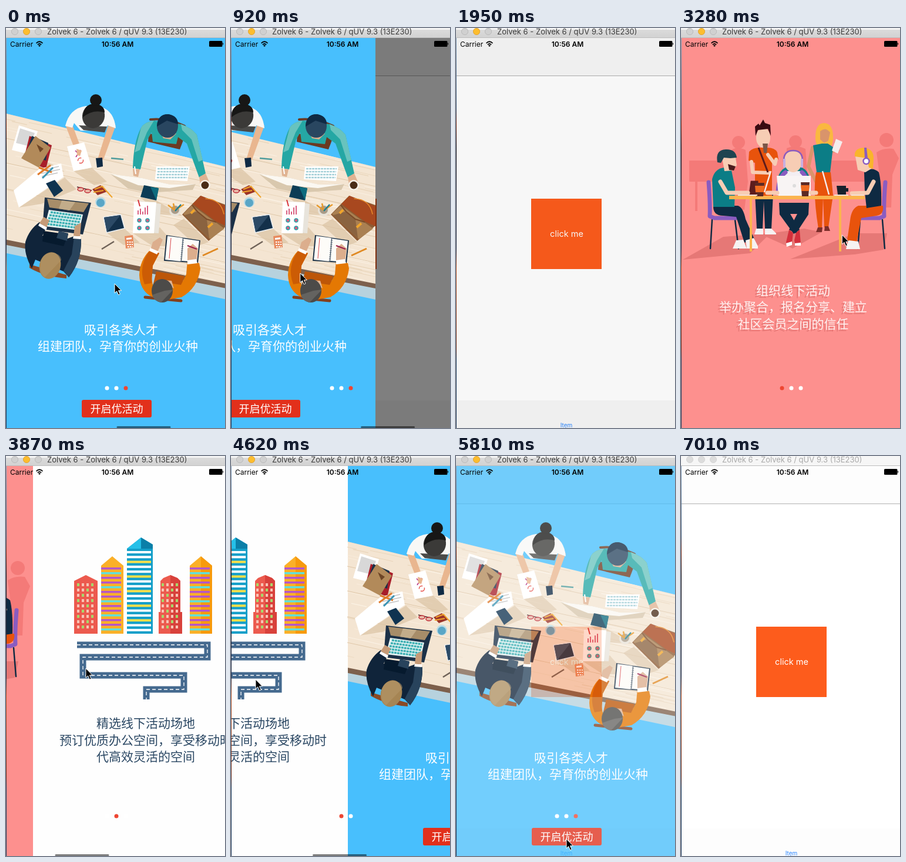
Write an HTML page that moves like this. It is 373 px wide and 682 px high and loops after 7.09 s.

```html
<!DOCTYPE html>
<html lang="zh">
<head>
<meta charset="utf-8">
<title>Onboarding pages</title>
<style>
html, body { margin: 0; width: 100%; height: 100%; overflow: hidden; background: #fff }
svg { display: block; width: 100%; height: 100% }
text { font-family: Inter, "Noto Sans CJK SC", "Noto Sans CJK", sans-serif }
.cn { font: 500 21px "Noto Sans CJK SC", "Noto Sans CJK", sans-serif; text-anchor: middle }
.btn { font-size: 18px; font-weight: 400 }
.mid { text-anchor: middle }
.ln { fill: none; stroke-linecap: round; stroke-linejoin: round }
</style>
</head>
<body>
<svg viewBox="0 0 373 682" preserveAspectRatio="none">
<defs>
  <linearGradient id="desk" x2="0" y2="1">
    <stop offset="0" stop-color="#8fa9c4"/><stop offset=".2" stop-color="#3d5878"/><stop offset=".24" stop-color="#7a2f1c"/>
    <stop offset=".3" stop-color="#14121c"/><stop offset=".55" stop-color="#25304a"/><stop offset=".6" stop-color="#b5562c"/>
    <stop offset=".8" stop-color="#6a2c1c"/><stop offset=".83" stop-color="#1f4063"/><stop offset="1" stop-color="#203a5c"/>
  </linearGradient>
  <linearGradient id="chrome" x2="0" y2="1">
    <stop offset=".16" stop-color="#f4f4f4"/><stop offset=".2" stop-color="#dadada"/><stop offset="1" stop-color="#d2d2d2"/>
  </linearGradient>
  <clipPath id="top"><path d="M0 146L376 237V436L0 361Z"/></clipPath>
  <clipPath id="screen"><rect x="1" y="17" width="372" height="665"/></clipPath>
</defs>
<rect width="373" height="682" fill="url(#desk)"/>
<g clip-path="url(#screen)">
  <rect x="1" y="17" width="372" height="665" fill="#fff"/>
  <g id="bars" fill="#f7f7f7"><rect x="1" y="17" width="372" height="64"/><rect x="1" y="635" width="372" height="47"/></g>
  <path d="M1 81.500H373" stroke="#b0b0b0"/>
  <rect x="128" y="291" width="120" height="120" fill="#fd5c1c"/>
  <text x="188.500" y="356" class="mid" font-size="14.500" fill="#fff">click me</text>
  <text x="188" y="680.500" class="mid" font-size="10" fill="#2a86ff">Item</text>

  <g id="guide">
    <rect x="1" y="17" width="372" height="665" fill="#000" opacity=".5"/>
    <g id="pages">
      <g id="meet">
        <rect x="1" y="17" width="375" height="665" fill="#fd908e"/>
        <g fill="#f47a78">
          <path d="M14 226H90V262H14ZM24 262H28V312H24ZM240 226H318V262H240ZM83 210Q94 200 110 208L114 262 108 310H86ZM180 205Q195 198 212 206L216 262H178ZM333 212Q345 204 362 206L371 222 360 250 358 306H340L338 250Z"/>
          <circle cx="98" cy="195" r="11"/><circle cx="195" cy="194" r="11"/><circle cx="350" cy="191" r="12"/>
        </g>
        <path d="M3 395L72 356 152 350 118 384ZM186 394L296 350H351L345 378 296 386ZM136 352L210 342 240 348 190 376Z" fill="#e67876"/>
        <!-- woman -->
        <path d="M229 190Q228 162 244 162 260 163 259 190 258 206 244 208 231 208 229 190Z" fill="#fab840"/>
        <path d="M237 176Q246 168 254 178L251 192 244 196 237 190Z" fill="#d9946b"/>
        <path d="M224 204L217 236 230 262M256 210L267 208 264 196" stroke="#d9946b" stroke-width="6" class="ln"/>
        <path d="M225 200L240 197 250 197 259 203 254 246H231Z" fill="#0b7d86"/>
        <path d="M230 246H255L259 285 251 340H244L242 290 240 342H234Q224 280 230 246Z" fill="#e8530c"/>
        <path d="M233 340H241L240 348H230ZM245 338H251L254 346H244Z" fill="#7c2d2a"/>
        <path d="M264 189L275 194 267 214 257 209Z" fill="#f5ecec"/>
        <!-- standing man -->
        <path d="M126 282H157L154 342H143L141 295 139 342H129Z" fill="#0e2a42"/>
        <path d="M116 211Q122 204 134 204H147Q160 204 164 212L166 224 155 228V286H126V230L115 226Z" fill="#e8530c"/>
        <path d="M120 228L122 246 150 247M162 224L160 232 148 216" stroke="#f7cdb4" stroke-width="6" class="ln"/>
        <path d="M132 204L148 246M120 262H130V284H117Z" stroke="#5c1c1c" stroke-width="3" fill="#5c1c1c"/>
        <ellipse cx="140" cy="187" rx="12" ry="17" fill="#f7cdb4"/>
        <path d="M127 184L126 168 132 163 134 166 140 156 143 162 152 165 153 184 148 172 131 174Z" fill="#3a0b12"/>
        <path d="M128 342H140V352H125ZM143 342H154L162 350V352H143Z" fill="#f6f2f2"/>
        <path d="M139 197H148L146 213H141Z" fill="#7a5748"/>
        <path d="M153 244L142 280M241 244L252 284" stroke="#f6eaea" stroke-width="2.500"/>
        <!-- middle person -->
        <ellipse cx="192" cy="259" rx="27" ry="25" fill="#0b7d86"/>
        <path d="M163 285Q164 250 180 244H204Q219 250 220 285Z" fill="#f3eef2"/>
        <path d="M165 280Q166 254 178 246M218 280Q216 254 206 246" stroke="#8a5cc0" stroke-width="7" class="ln"/>
        <ellipse cx="191" cy="227" rx="15" ry="19" fill="#f7cdb4"/>
        <path d="M175 228Q174 209 191 209 208 209 207 228" stroke="#8a5cc0" stroke-width="2.500" class="ln"/>
        <path d="M174 223H178V238H174ZM204 223H208V238H204Z" fill="#c9b0e0"/>
        <path d="M167 298H218L217 318 196 350 184 344 198 317 186 317 202 344 192 351 168 318Z" fill="#0e2a42"/>
        <path d="M184 344L191 349 189 367 180 371 179 365ZM196 349L202 344 204 368 195 371 193 362Z" fill="#d4303c"/>
        <path d="M179 367L189 364V370L180 373ZM194 367L204 366V371H194Z" fill="#fff"/>
        <!-- chairs -->
        <path d="M53 327L50 376M92 327L98 376M305 327L301 376M343 327L347 376" stroke="#0e2a42" stroke-width="2.500" class="ln"/>
        <path d="M47 263Q50 300 49 321L57 324H94M348 263Q345 300 346 321L338 324H302" stroke="#8a5cc0" stroke-width="7" class="ln"/>
        <!-- left man -->
        <path d="M55 303H97Q106 306 110 326L125 360 108 366 94 322 72 320Q54 320 55 303Z" fill="#0e2a42"/>
        <path d="M94 362L106 361 112 376H88ZM110 362L124 358 131 372V376H112Z" fill="#f6f2f2"/>
        <path d="M53 258Q57 240 73 238L86 243 92 272 91 305H55Z" fill="#0b7d86"/>
        <path d="M67 262L78 281H114" stroke="#f7cdb4" stroke-width="7" class="ln"/>
        <path d="M70 221H93L95 234 88 243 74 244Z" fill="#f7cdb4"/>
        <path d="M80 232L93 236 90 243 82 242Z" fill="#4a1c1c"/>
        <path d="M62 229Q58 208 76 207 93 206 95 221L84 222 73 221 68 230Z" fill="#1e4450"/>
        <!-- right man -->
        <path d="M344 303H302Q290 308 288 328L283 362 299 366 307 324 333 320Q346 318 344 303Z" fill="#e8530c"/>
        <path d="M286 362L302 364 305 377H281Q282 370 286 362Z" fill="#f6f2f2"/>
        <path d="M312 246Q325 235 337 246 342 266 341 303L316 307 313 280Z" fill="#0e2a42"/>
        <path d="M328 262L318 281 291 282" stroke="#f7cdb4" stroke-width="7" class="ln"/>
        <path d="M297 219H325L324 240 314 246 301 242Z" fill="#f7cdb4"/>
        <path d="M296 219Q294 205 312 204 328 206 328 222L327 240 320 238 317 222Z" fill="#f9b52b"/>
        <path d="M312 204L316 204 318 222H313Z" fill="#8a5cc0"/><circle cx="315.500" cy="227" r="5" fill="#fff" stroke="#8a5cc0" stroke-width="2.500"/>
        <!-- table -->
        <path d="M82 286H313V292H273V381H269V292H121V381H117V292H82Z" fill="#fbb44f"/>
        <path d="M163 252H221V286H166Z" fill="#f8f4f4"/><circle cx="193" cy="269" r="3" fill="#ddd"/>
        <path d="M147 281H164M222 281H230" stroke="#f7cdb4" stroke-width="7" class="ln"/>
        <path d="M126 264H142L140 287H128ZM204 263H219L217 287H206Z" fill="#5c2a24"/>
        <path d="M126 269H142L141 280H127ZM204 268H219L218 278H205Z" fill="#ee6a1e"/>
        <path d="M265 269H281V284H267ZM281 273H285V279H281" fill="#17212c"/><path d="M261 285H285M97 285H130M290 285H312" stroke="#f4e0d8" stroke-width="2"/>
      </g>
      <g id="place" transform="translate(375)">
        <rect x="1" y="17" width="375" height="665" fill="#fefefe"/>
        <g transform="translate(1)">
          <path d="M160 303V158L184 139 204 151V303Z" fill="#149fc9"/><path d="M184 139L204 151V158H184Z" fill="#0b7fa8"/><path d="M160 158L184 139V158Z" fill="#25c0e8"/>
          <path d="M214 303V266H217V213L222 208 234 203 246 208 251 213V266H254V303Z" fill="#ec5a4e"/><path d="M234 203L246 208 251 213V266H254V303H234Z" fill="#d8413b"/>
          <path d="M267 303V187L286 171 305 187V303Z" fill="#fbb028"/><path d="M286 171L305 187V303H286Z" fill="#f79a0d"/>
          <path d="M70 303V213L90 203 110 213V303Z" fill="#ec5a4e"/><path d="M116 303V187L135 171 154 187V303Z" fill="#fbb028"/>
          <g id="windows"/>
          <g fill="none">
            <path d="M75 322H297V343H85V374H257V398H193V415" stroke="#456a8f" stroke-width="11"/>
            <path d="M75 322H297V343H85V374H257V398H193V415" stroke="#fff" stroke-width="1.300" stroke-dasharray="6 4"/>
          </g>
        </g>
      </g>
      <g id="team" transform="translate(750)">
        <rect x="1" y="17" width="375" height="665" fill="#48bffd"/>
        <path d="M1 361L376 436V463L1 384Z" fill="#b7d2de"/>
        <path d="M1 360L376 435V444L1 370Z" fill="#7d604c"/>
        <path d="M1 146L376 237V436L1 361Z" fill="#f4e5d2"/>
        <g id="grain" clip-path="url(#top)" class="ln"/>
        <path d="M115 244L146 238 172 262 150 268ZM216 350L262 340 290 372 250 372ZM228 288L256 294 300 320 262 318ZM171 349L202 342 228 366 200 370ZM22 306L100 255 120 275 60 300ZM40 217L78 232 100 245 60 240ZM303 325L345 365 325 372 285 336Z" fill="#dcc3a4" opacity=".7"/>
        <!-- woman in white -->
        <path d="M101 165L112 162 128 206 121 217ZM187 166L175 163 160 211 156 224 166 224Z" fill="#e9b68f"/>
        <path d="M101 167Q108 137 136 133L163 135Q184 142 187 171L173 166 169 175H127L116 162 113 170Z" fill="#f8f8f6"/>
        <path d="M124 166L172 168 168 178 132 174Z" fill="#4a4a48"/>
        <ellipse cx="149" cy="150" rx="19" ry="21" fill="#3b3a38" transform="rotate(15 149 150)"/>
        <path d="M131 152Q132 129 152 129 168 132 168 144 148 138 131 152Z" fill="#171716"/><circle cx="153" cy="123" r="10" fill="#171716"/>
        <path d="M104 202L133 195 146 238 115 244Z" fill="#fff"/>
        <path d="M118 209L126 217M119 220L127 208" stroke="#b0267e" stroke-width="1.500"/><circle cx="127" cy="226" r="4.500" fill="none" stroke="#e6544e" stroke-width="1.500" stroke-dasharray="9 4"/>
        <path d="M120 206L129 209 126 218 121 217Z" fill="#e9b68f"/>
        <path d="M153 222L164 221 165 236 155 238Z" fill="#0f2a44"/>
        <path d="M179 222L200 224" stroke="#4e9c9c" stroke-width="2.500"/>
        <!-- man in teal -->
        <path d="M243 180L304 186 296 207 242 194Z" fill="#6b3a22"/>
        <path d="M246 156Q275 153 304 167" stroke="#6b3a22" stroke-width="4" class="ln"/>
        <path d="M230 170Q236 160 252 158L298 164Q316 170 325 182L340 248 329 255 308 197 293 186 290 198 250 194 248 178 241 190 229 241 216 239Q217 195 230 170Z" fill="#25a7a4"/>
        <path d="M230 170Q236 160 252 158L240 178 228 208 219 212ZM298 164Q316 170 325 182L335 225 328 228 316 190 300 174Z" fill="#68c3be"/>
        <path d="M262 176L290 180 280 190 268 188Z" fill="#dcae8d"/>
        <ellipse cx="275" cy="167" rx="18" ry="20" fill="#294660"/><path d="M257 168Q258 146 277 147 293 150 293 164L274 158Z" fill="#0f2a44"/>
        <path d="M216 240L228 241 225 254 217 252ZM329 254L340 248 346 262 338 272 331 267Z" fill="#e0b392"/>
        <circle cx="339" cy="268" r="9" fill="#f6f2ea"/><circle cx="339" cy="268" r="6.500" fill="#4a2c17"/>
        <path d="M256 236L313 236 309 261 254 258Z" fill="#fff"/>
        <path d="M258 240H310M258 245H309M257 250H309M257 255H308" stroke="#a5d0d8" stroke-width="2.500" stroke-dasharray="4 1"/>
        <path d="M178 249L232 256 280 267 323 266 318 276 244 281 208 274Z" fill="#d9c8ae"/><path d="M178 249L232 256 280 267 323 266 278 273 225 268Z" fill="#fbf8f2"/>
        <path d="M235 268L260 273 256 294 229 288Z" fill="#0d3c55"/><path d="M246 271L260 273 256 294Z" fill="#0e6b7e"/>
        <path d="M221 249L219 236" stroke="#fff" stroke-width="2"/>
        <!-- desk things -->
        <path d="M22 166L54 176 42 216 10 208Z" fill="#fff"/><path d="M24 171L49 179 41 202 17 196Z" fill="#d8d8d8"/>
        <path d="M40 184L78 200 68 240 30 224Z" fill="#a81e2a"/><path d="M44 184L72 196 68 226 34 216Z" fill="#1b3048"/><path d="M50 184L76 204 56 238 26 222Z" fill="#b28a5a"/><path d="M52 198L64 206 58 212Z" fill="#6d4526"/>
        <path d="M13 277L57 240 94 231 98 254 22 306Z" fill="#fff"/><path d="M60 243L90 236M60 248L92 241M61 253L88 247" stroke="#c4c4c4" stroke-width="1.500"/>
        <path d="M54 250L76 234M56 238L78 246" stroke="#e07a2a" stroke-width="3"/><path d="M62 256L80 238" stroke="#3a94b4" stroke-width="3"/>
        <path d="M68 265L83 259 97 277 82 288Z" fill="#0f3350"/>
        <path d="M121 271L146 277" stroke="#4a2a2a" stroke-width="1.500"/><g fill="#e8b9a8" stroke="#c2303a" stroke-width="1.500"><ellipse cx="127" cy="275" rx="5" ry="3"/><ellipse cx="139" cy="278" rx="5" ry="3"/></g>
        <path d="M147 275L161 268 172 279 156 285Z" fill="#9c3428"/><path d="M151 275L164 270 181 289M149 280L166 277" stroke="#f0a52c" stroke-width="2" fill="none"/>
        <circle cx="161" cy="297" r="9" fill="#b9dbe6"/><circle cx="161" cy="298" r="7" fill="#5aa6c6"/>
        <path d="M165 322L196 317 203 342 171 350Z" fill="#e9eef2"/><path d="M167 323L195 319 201 341 172 348Z" fill="#13304a"/><path d="M167 323L195 319 172 348Z" fill="#2c4a66"/>
        <path d="M163 377L184 364" stroke="#6f6258" stroke-width="2.500"/>
        <path d="M202 355L216 353 218 374 204 376Z" fill="#e88a5e"/><path d="M205 358L214 357V360L205 361Z" fill="#fff"/><path d="M206 365H216M206 369H216M207 373H216" stroke="#fff" stroke-width="2" stroke-dasharray="2.500 1.500"/>
        <path d="M224 294L264 300 260 350 222 348Z" fill="#e8e4dc"/><path d="M218 296L256 297 252 350 216 350Z" fill="#fff"/>
        <path d="M225 318V311M229 318V308M233 318V313M237 318V306M241 318V303" stroke="#d95f80" stroke-width="2"/>
        <g fill="#d95f80" stroke="#2aa0a8" stroke-width="1.500"><circle cx="227" cy="328" r="3"/><circle cx="241" cy="328" r="3"/><circle cx="227" cy="341" r="3"/><circle cx="241" cy="341" r="3"/></g>
        <path d="M225 293L228 304" stroke="#d9343a" stroke-width="2"/>
        <circle cx="288" cy="311" r="10" fill="#e9e3d8"/><circle cx="288" cy="310" r="7" fill="#a99b88"/><path d="M288 311L276 302M289 310L303 301M287 308L285 299" stroke="#e89a2a" stroke-width="2.500"/><path d="M288 312L298 301" stroke="#1b7f94" stroke-width="2.500"/>
        <path d="M300 318L331 286 376 302V337L345 363Z" fill="#8d5b34"/><path d="M318 300L332 286 376 304V338L358 330Z" fill="#a8481f"/><path d="M302 317L317 302 372 342 348 360Z" fill="#aa8052"/>
        <path d="M304 319L326 313 342 326 346 358Z" fill="#8a6340"/><path d="M317 302L326 313 342 326 358 331" stroke="#7b4a28" stroke-width="2" fill="none"/>
        <path d="M315 316L321 310M344 340L352 333" stroke="#f0a52c" stroke-width="4"/><path d="M340 291Q366 292 371 317" stroke="#e8892a" stroke-width="1.500" class="ln"/>
        <path d="M335 388L361 376" stroke="#e08a24" stroke-width="3"/>
        <!-- laptop and man in navy -->
        <path d="M66 289L145 298 131 352 62 343Z" fill="#1b3047"/><path d="M70 291L141 299 132 314 74 306Z" fill="#a78d69"/><path d="M95 294L118 297 108 311 90 308Z" fill="#c2ac8a"/>
        <path d="M73 310L131 318 125 345 66 338Z" fill="#e8f5f4"/><path d="M76 314L128 321M74 319L127 326M72 324L126 331M71 329L124 336M70 334L124 341" stroke="#3fb0b4" stroke-width="3.500" stroke-dasharray="4 1"/>
        <path d="M40 403L103 421V427Q66 424 40 409Z" fill="#8a4a26"/>
        <path d="M33 365Q39 344 57 331L69 340 62 354 102 360 116 355 128 360Q129 397 107 425L98 415 50 395 44 410Q30 385 33 365Z" fill="#10243a"/>
        <path d="M116 356L128 360Q129 397 107 425L98 414 112 386Z" fill="#28435c"/><path d="M64 346L106 352 98 372 62 364Z" fill="#061a2e"/><path d="M90 346L106 350 104 363 86 358Z" fill="#28435c"/>
        <path d="M57 333L64 322 74 328 69 340ZM115 354L117 338 128 332 126 356Z" fill="#c69b78"/><path d="M57 333L70 340 68 345 55 337ZM115 355H127V360L114 359Z" fill="#fff"/>
        <ellipse cx="75" cy="405" rx="18" ry="23" fill="#a68554" transform="rotate(15 75 405)"/><path d="M59 400Q62 384 80 383 94 386 94 396L66 425Q56 418 59 400Z" fill="#b89a6c" opacity=".5"/>
        <!-- notebook and man in orange -->
        <path d="M273 353L331 362 327 401 269 397Z" fill="#1a3046"/><path d="M275 354.500L301 358 298 398 271 395ZM302 359L329 363 325 399 299 397Z" fill="#fdfcf8"/>
        <path d="M281 358L278 393" stroke="#d8454a"/><path d="M302 358L298 398" stroke="#6a7886" stroke-width="3" stroke-dasharray="1.500 2"/>
        <path d="M256 415L304 423 298 444 250 440Z" fill="#bd5608"/>
        <path d="M237 459L298 465" stroke="#83401e" stroke-width="5" class="ln"/>
        <path d="M246 378Q228 395 227 421 228 446 246 457L265 465 299 459Q327 443 331 410L329 401 309 397 307 420 298 438 272 434 250 438 247 421 250 405 261 384Z" fill="#e47803"/>
        <path d="M246 378L261 384 250 405 248 435 236 437Q224 405 246 378Z" fill="#cc5c05"/>
        <path d="M246 378L250 365 262 357 267 361 258 382ZM309 400L309 376 318 368 327 376 324 400Z" fill="#dcae8d"/><path d="M246 375L260 381 257 386 244 380ZM309 396L324 394 326 401 309 403Z" fill="#fff"/>
        <path d="M309 371L325 377" stroke="#9c1f4a" stroke-width="2"/>
        <path d="M262 429L282 431 286 444Z" fill="#e0b392"/><ellipse cx="266" cy="448" rx="18" ry="20" fill="#4c4b49"/><path d="M285 446L264 468Q252 466 249 455L270 448Z" fill="#646360"/>
        <g fill="#fff" class="cn"><text x="196" y="522">吸引各类人才</text><text x="190.500" y="550">组建团队，孕育你的创业火种</text></g>
        <rect x="129" y="634" width="119" height="30" rx="3" fill="#e2301b"/>
        <text x="188.500" y="656" class="cn btn" fill="#fff">开启优活动</text>
      </g>
    </g>
    <g id="dots"><circle cx="172" cy="614" r="3.500"/><circle cx="188" cy="614" r="3.500"/><circle cx="204" cy="614" r="3.500"/></g>
    <rect id="thumb" y="679" width="92" height="3" rx="1.500" fill="#000" opacity=".5"/>
  </g>

  <g font-size="12">
    <text x="7" y="32">Carrier</text><text x="190" y="32" class="mid" font-weight="600">10:56 AM</text>
    <g stroke="#000" stroke-width="1.700" fill="none"><path d="M51.500 26Q57 20.500 62.500 26M53.800 28.500Q57 25.500 60.200 28.500"/></g><path d="M55 30Q57 28 59 30L57 32Z"/>
    <rect x="346" y="22" width="22.500" height="10" rx="1.500"/><path d="M369 25Q371.500 27 369 29Z"/>
  </g>
  <path id="arrow" d="M0 0V16L3.700 12.600 6.500 19 9.200 17.800 6.500 11.700H11.500Z" stroke="#fff"/>
</g>
<rect id="bar" width="373" height="17"/>
<path d="M0 16.500H373" stroke="#bdbdbd"/>
<g id="lights" stroke-width=".8"><circle cx="15" cy="6" r="5.600"/><circle id="amber" cx="35" cy="6" r="5.600"/><circle cx="55" cy="6" r="5.600"/></g>
<text id="title" x="70" y="11" font-size="13">Zolvek 6 - Zolvek 6 / qUV 9.3 (13E230)</text>
</svg>
<script>
const $ = id => document.getElementById(id);
const LOOP = 7090, PAGE = 375;
const set = (el, attrs) => { for (const k in attrs) el.setAttribute(k, attrs[k]); };

// Captions, optionally with a drop shadow
function caption(page, rows, fill, shade) {
  const rowsAt = (dx, dy, color) => rows.map(([s, x, y]) =>
    `<text class="cn" x="${x + dx}" y="${y + dy}" fill="${color}">${s}</text>`).join("");
  page.insertAdjacentHTML("beforeend", (shade ? rowsAt(-3, 3, shade) : "") + rowsAt(0, 0, fill));
}
caption($("meet"), [["组织线下活动", 191, 455], ["举办聚合，报名分享、建立", 191, 483], ["社区会员之间的信任", 191, 512]], "#fdf1f0", "#e67876");
caption($("place"), [["精选线下活动场地", 193, 463], ["预订优质办公空间，享受移动时", 193, 492], ["代高效灵活的空间", 193, 520]], "#2a4763");

// Building windows
const stripe = (x, y, w, h, fill) => `<rect x="${x}" y="${y}" width="${w}" height="${h}" fill="${fill}"/>`;
let windows = "";
for (let i = 0; i < 17; i++) windows += stripe(160, 162 + i * 8.3, 41, 4, i % 3 == 2 ? "#f8e04a" : "#fff");
for (const x of [267, 116])
  for (let i = 0; i < 14; i++) windows += stripe(x, 190 + i * 8, 34, 3.5, i % 3 == 1 ? "#5fe0dc" : "#b556c8");
for (const x of [219, 75])
  for (let r = 0; r < 9; r++)
    for (let c = 0; c < 4; c++) windows += stripe(x + c * 8, 217 + r * 9, 4, 5, (r + c) % 3 ? "#f7c4b4" : "#a8d86a");
$("windows").innerHTML = windows;

// Wood grain
let seed = 7;
const rnd = () => (seed = seed * 16807 % 2147483647) / 2147483647;
let grain = "";
for (let i = 0; i < 110; i++) {
  const x = rnd() * 400 - 40, y = 146 + x * .225 + rnd() * 212, len = 25 + rnd() * 90;
  grain += `<path d="M${x} ${y}q${len / 2} ${len * .1} ${len} ${len * .22}" stroke="${i % 2 ? "#fbf2e5" : "#e9d5ba"}" stroke-width="${.5 + rnd() * .8}"/>`;
}
for (const y of [188, 230, 274, 318])
  grain += `<path d="M0 ${y}L376 ${y + 82}" stroke="#dfc7a8"/>`;
$("grain").innerHTML = grain;

const steps = [0];
for (const [from, to, n] of [[170, 1210, 8], [1360, 2390, 8], [2540, 3580, 8], [3730, 4770, 8], [4910, 5510, 5], [5810, 6260, 4]])
  for (let i = 0; i < n; i++) steps.push(from + (to - from) * i / (n - 1));
steps.push(7010);

function track(t, keys) {
  let a = keys[0];
  for (const b of keys) {
    if (t < b[0]) return a.slice(1).map((v, i) => v + (b[i + 1] - v) * (t - a[0]) / (b[0] - a[0]));
    a = b;
  }
  return a.slice(1);
}
const scroll = [[0, 750], [320, 750], [470, 767], [912, 880], [1210, 1042], [1360, 1103], [1507, 1125], [2239, 1125], [2240, 0],
  [3280, 0], [3580, 190], [3730, 330], [3880, 375], [4175, 375], [4320, 399], [4621, 552], [4770, 662], [4910, 730], [5060, 750]];
const fade = [[0, 1], [1507, 1], [1800, .3], [1949, .06], [2096, 0], [2390, 0], [2835, 1], [5510, 1], [5810, .765], [5960, .45], [6110, .13], [6260, 0]];
const mouse = [[0, 185, 436], [320, 247, 428], [912, 118, 418], [1360, 0, 412], [1507, -30, 410], [2096, -20, 390], [2390, 190, 352], [2690, 190, 352],
  [3280, 302, 353], [3580, 170, 358], [3800, 120, 364], [4175, 240, 381], [4621, 42, 381], [4770, 12, 388], [5060, 70, 500], [5510, 188, 653]];

function draw(now) {
  const t = steps.filter(s => s <= now + 1).pop();
  const idle = t >= 7010;
  const [pos] = track(t, scroll), [alpha] = track(t, fade), [x, y] = track(t, mouse);
  set($("guide"), { opacity: alpha });
  set($("pages"), { transform: `translate(${-Math.round(pos)})` });
  set($("thumb"), { x: 1 + pos / 4, visibility: alpha && pos != track(t - 150, scroll)[0] ? "inherit" : "hidden" });
  const active = Math.round(pos / PAGE);
  set($("dots"), { visibility: active > 2 ? "hidden" : "inherit" });
  [...$("dots").children].forEach((d, i) => set(d, { fill: i == active ? "#ee4632" : "#fff" }));
  set($("arrow"), { transform: `translate(${x} ${y})`, visibility: idle ? "hidden" : "visible" });
  set($("bars"), { fill: idle ? "#fdfdfd" : "#f7f7f7" });
  set($("bar"), { fill: idle ? "#f6f6f6" : "url(#chrome)" });
  set($("title"), { fill: idle ? "#a8a8a8" : "#3a3a3a" });
  set($("lights"), { fill: idle ? "#dcdcdc" : "#d0d0d0", stroke: idle ? "#d0d0d0" : "#b4b4b4" });
  set($("amber"), idle ? { fill: "inherit", stroke: "inherit" } : { fill: "#fdbd2e", stroke: "#dc9c28" });
}
const start = performance.now();
function tick() {
  draw((performance.now() - start) % LOOP);
  requestAnimationFrame(tick);
}
tick();
</script>
</body>
</html>
```
